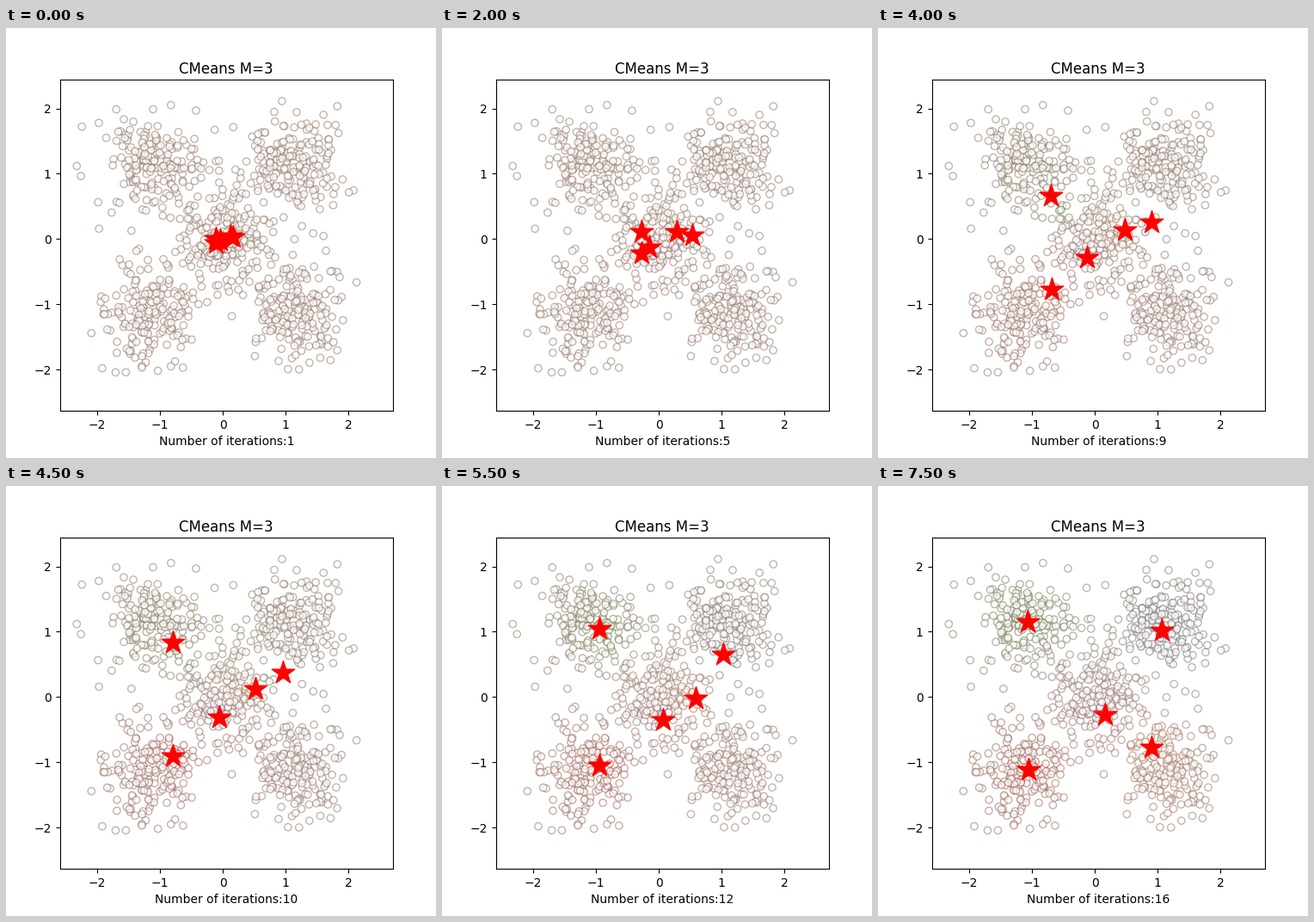
A matplotlib script for the animation above (8 s loop, 500 by 500 pixels).

```python
import numpy as np
import matplotlib.pyplot as plt
from matplotlib.animation import FuncAnimation

SIZE, DPI = 500, 100
STEPS, INTERVAL = 16, 500
XLIM, YLIM = (-2.598, 2.709), (-2.632, 2.442)
PALETTE = np.array([plt.matplotlib.colors.to_rgb(f"C{k}") for k in range(5)])

# Five round blobs: one in the middle, four in the corners
OFFSET, SPREAD, PER_BLOB = 1.13, 0.38, 200
BLOBS = [(-1, 1), (1, 1), (-1, -1), (1, -1), (0.03, 0.03)]


def to_data(px):
    """Stage pixels to axes units."""
    px = np.asarray(px, float)
    x = XLIM[0] + (px[..., 0] - 62.5) / 387.5 * (XLIM[1] - XLIM[0])
    y = YLIM[0] + (445 - px[..., 1]) / 385 * (YLIM[1] - YLIM[0])
    return np.stack([x, y], axis=-1)


def make_points():
    rng = np.random.default_rng(4)
    mids = np.repeat(OFFSET * np.array(BLOBS), PER_BLOB, axis=0)
    return rng.permutation(rng.normal(mids, SPREAD))


def ease(step, shift, mid, rate):
    """Logistic move by shift, halfway at mid."""
    return shift / (1 + np.exp(-rate * (step - mid)))


def centres(step):
    """Centres in palette order: each drifts off slowly, speeds up, settles."""
    def go(*move):
        return ease(step, *move)

    blue = (252 + go(79, 5.1, 0.42), 243 - go(81, 11.4, 0.55))
    orange = (255 + go(40, 5.5, 0.4) + go(34, 15, 0.8),
              243 - go(10, 4.5, 0.6) + go(85, 14, 0.82))
    green = (247 - go(75, 8, 0.45), 246 - go(89, 8.5, 0.63))
    red = (247 - go(74, 8, 0.45), 248 + go(83, 7.7, 0.58))
    purple = (251 - go(14, 3.5, 0.8) + go(27, 10.6, 0.75),
              244 + go(31, 6.5, 0.42) - go(16, 16, 2))
    return to_data([blue, orange, green, red, purple])


def colours(step):
    """Blend the palette by membership in the previous step's centres."""
    mid = centres(max(step - 1, 1))
    dist = np.linalg.norm(points[:, None] - mid[None], axis=2)
    member = (dist + 1e-6) ** -0.45
    member /= member.sum(axis=1, keepdims=True)
    alpha = np.clip(0.5 + member.max(axis=1) ** 3, 0, 1)
    return np.column_stack([member @ PALETTE, alpha])


points = make_points()
fig, ax = plt.subplots(figsize=(SIZE / DPI, SIZE / DPI), dpi=DPI)
ax.set(xlim=XLIM, ylim=YLIM, xticks=range(-2, 3), yticks=range(-2, 3))
ax.set_title("CMeans M=3", pad=5.3)
dots = ax.scatter(*points.T, s=36, facecolors=(1, 1, 1, 0.68), edgecolors=colours(1))
stars = ax.scatter(*centres(1).T, s=400, marker="*", c="red")


def draw(frame):
    step = frame + 1
    dots.set_edgecolor(colours(step))
    stars.set_offsets(centres(step))
    ax.set_xlabel(f"Number of iterations:{step}")
    return dots, stars


anim = FuncAnimation(fig, draw, frames=STEPS, interval=INTERVAL,
                     repeat=True, repeat_delay=0)
plt.show()
```
